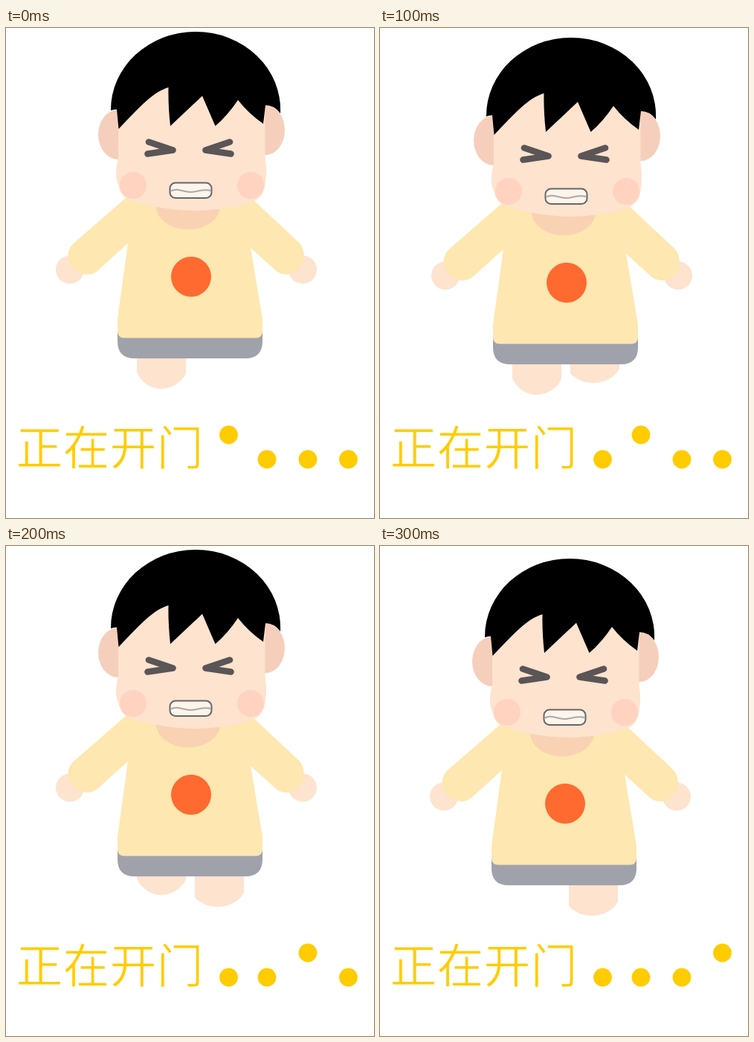
Animation of 495 by 660 pixels, one loop 0.4 s. Source, as an HTML page:

```html
<!DOCTYPE html>
<html lang="zh-CN">
<head>
<meta charset="utf-8">
<title>正在开门</title>
<style>
  html, body { margin: 0; width: 100%; height: 100%; overflow: hidden; background: #fff; }
  svg { display: block; width: 100%; height: 100%; }
  /* The white outline trims the glyphs to a light weight. */
  .label { font: 300 63px "Noto Sans CJK SC", "Noto Sans CJK", sans-serif; stroke: #fff; stroke-width: 1; }
  .skin { fill: #fee3cf; }
  .ear { fill: #f5cfbb; }
  .cheek { fill: #ffd3bf; }
  .shirt { fill: #fee7b0; }
  .eyes { fill: none; stroke: #5a5556; stroke-width: 8.6; stroke-linecap: round; stroke-linejoin: round; }
</style>
</head>
<body>
<svg viewBox="0 0 495 660">
  <g id="boy">
    <path id="legL" class="skin" d="M176 430V464C182 478 196 486 208 486C222 486 236 478 242 465V430Z"/>
    <path id="legR" class="skin" d="M254 430V473C262 482 274 486 285 486C299 486 314 479 320 467V430Z"/>
    <circle class="skin" cx="86" cy="325.500" r="19"/>
    <circle class="skin" cx="399" cy="325.500" r="19"/>
    <path fill="#a0a2ab" d="M150 400H345V422Q345 445 322 445H173Q150 445 150 422Z"/>
    <path class="shirt" d="M161 229L91 290C74 307 89 332 109 332Q117 332 123 327L164 290L150 392V408Q150 417.500 159 417.500H336Q345 417.500 345 408V392L329 296L361 325Q368 332 377 332C399 331 409 304 393 288L331 230Z"/>
    <ellipse cx="245" cy="240" rx="43" ry="31.500" fill="#f9d2b3"/>
    <circle cx="249" cy="335" r="27" fill="#ff6a30"/>
    <ellipse class="ear" cx="151" cy="143.500" rx="27" ry="33.500"/>
    <ellipse class="ear" cx="349" cy="137.500" rx="26" ry="33.500"/>
    <path class="skin" d="M151 70V176C147 190 147 203 151 211C154 224 160 230 170 233C200 242 230 246 256 246C290 245 315 240 332 234C344 229 348 219 349 208C351 193 350 186 348.500 176V70Z"/>
    <circle class="cheek" cx="171" cy="212" r="18"/>
    <circle class="cheek" cx="329" cy="212" r="18"/>
    <path d="M141 111A114 105 0 0 1 255 5A114 105 0 0 1 369 115Q361 104 349 104L346 129Q326 115 312 97Q298 118 281.500 132L264 91.500L221 132Q218 104 218.500 80C198 86 180 106 151.500 136L149 109.500Q145 109.500 141 111Z"/>
    <path class="eyes" d="M192 153.500L224.500 164.500L190.500 169.500M301 153.500L268.500 164.500L302.500 169.500"/>
    <rect x="220.500" y="208.500" width="56" height="20.500" rx="7.500" fill="#fdf4ea" stroke="#66676a" stroke-width="2"/>
    <path d="M222 219.500C231 215 238 221 248 221S264 216 275.500 219" fill="none" stroke="#aaa8ae" stroke-width="2"/>
  </g>
  <g fill="#fc0">
    <text class="label" x="13.500" y="588">正在开门</text>
    <g id="dots"></g>
  </g>
</svg>
<script>
  const STEP = 100;
  const get = id => document.getElementById(id);
  const move = (el, x, y) => el.setAttribute("transform", `translate(${x} ${y})`);

  const bob = [[0, 0], [2, 8], [0, 0], [0, 12]];
  // Leg lift: down, down, half raised, fully raised; the right leg mirrors this order.
  const lift = [0, 0, -16, -45];

  const dots = [299.5, 351, 406, 460.5].map(cx => {
    const dot = document.createElementNS("http://www.w3.org/2000/svg", "circle");
    dot.setAttribute("cx", cx);
    dot.setAttribute("r", 12.4);
    return get("dots").appendChild(dot);
  });

  function draw(ms) {
    const step = Math.floor(ms / STEP) % 4;
    move(get("boy"), ...bob[step]);
    move(get("legL"), 0, lift[step]);
    move(get("legR"), 0, lift[3 - step]);
    dots.forEach((dot, i) => dot.setAttribute("cy", i === step ? 548 : 581));
  }

  const start = performance.now();
  function tick() {
    draw(performance.now() - start);
    requestAnimationFrame(tick);
  }
  tick();
</script>
</body>
</html>
```
